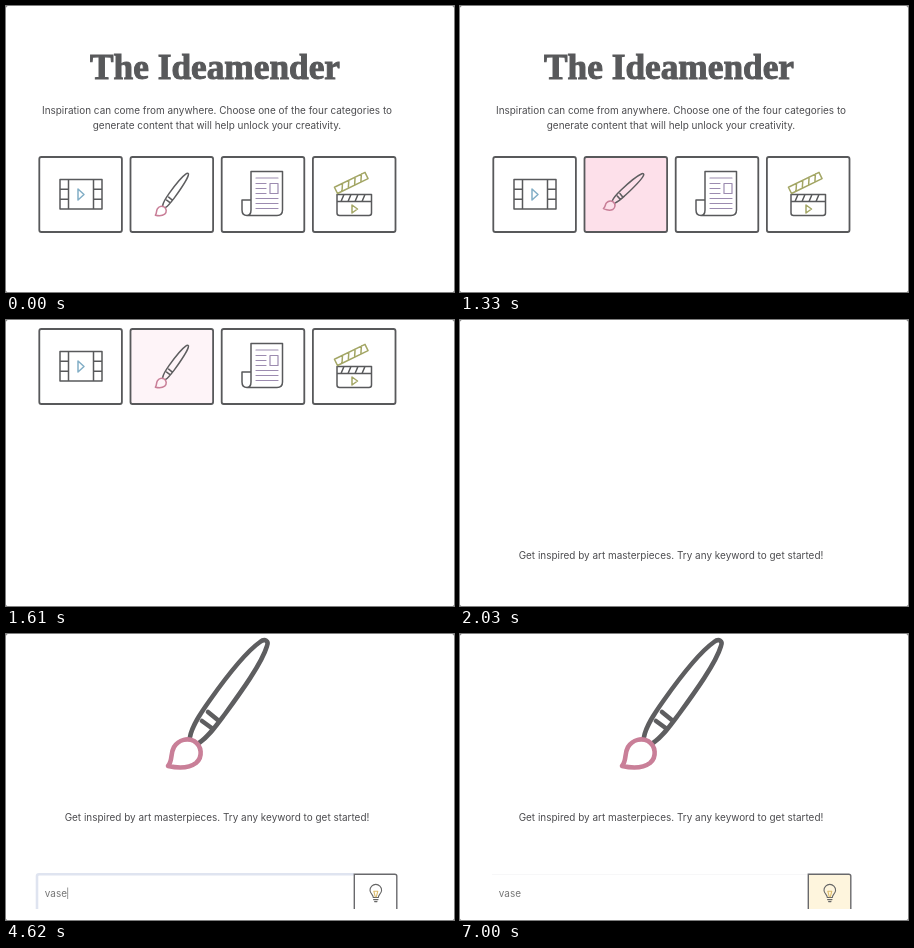
Write an HTML page that moves like this. It is 448 px wide and 286 px high and loops after 8000 ms.

```html
<!DOCTYPE html>
<html lang="en">
<head>
<meta charset="utf-8">
<title>Idea generator</title>
<style>
  html, body { margin: 0; width: 100%; height: 100%; overflow: hidden; background: #555; }
  svg { display: block; width: 100vw; height: 100vh; background: #fff; border-radius: 2px; }
  text { font-family: Inter, Roboto, sans-serif; font-size: 9.95px; fill: #4c4c4f; }
  .mid { text-anchor: middle; }
  .title { font: bold 35.3px "Liberation Serif", "Noto Serif", serif; fill: #58595b; stroke: #58595b; stroke-width: 1; }
  .typed { fill: #757575; }
  .card, .icon { fill: none; stroke: #58595b; stroke-width: 1.5; stroke-linejoin: round; stroke-linecap: round; }
  .card { stroke-width: 1.8; }
  .blue { stroke: #82aec6; }
  .purple { stroke: #9c8bb0; stroke-width: 1.2; }
  .olive { stroke: #a3a665; }
  .brush { fill: none; stroke: #5e5e60; stroke-width: 4.6; stroke-linecap: round; stroke-linejoin: round; }
  .bristle { stroke: #c97f98; }
</style>
</head>
<body>
<svg viewBox="0 0 448 286">
  <defs>
    <g id="brush" class="brush">
      <path d="M184 103C186 92 194 80 204 66C221 42 240 18 254 8C259 4 263 7 261 12C256 29 235 58 219 80C210 92 203 102 193 109M202 78L213 87M196 87L207 95"/>
      <path class="bristle" d="M162 132C167 126 164 120 168 113C173 105 182 104 188 107C196 112 197 123 190 129C182 135 171 134 162 132Z"/>
    </g>
  </defs>

  <g id="home">
    <text class="title mid" x="209" y="73">The Ideamender</text>
    <text class="mid" x="211" y="107.5">Inspiration can come from anywhere. Choose one of the four categories to</text>
    <text class="mid" x="211" y="123">generate content that will help unlock your creativity.</text>
    <rect id="tint" x="125" y="151" width="82" height="75" fill="#fde0ea"/>
    <g id="cards"></g>

    <g class="icon">
      <path d="M54 173.5H96V203H54ZM62.5 173.5V203M87.5 173.5V203M54 183.3h8.5M54 193.2h8.5M87.5 183.3H96M87.5 193.2H96"/>
      <path class="blue" d="M72 183L78 188.5L72 194Z"/>
    </g>
    <use id="smallBrush" href="#brush"/>
    <g class="icon">
      <path d="M245 204V165.5H276.5V204Q276.5 209.5 271 209.5H241Q236 209.5 236 204V194H245V204Q245 209.5 240.5 209.5"/>
      <path class="purple" d="M250 172H272M250 177.5h10M250 182.5h10M250 187.5h10M250 192.5H272M250 197.5H272M250 202.5H272M264 177.5h8v10h-8Z"/>
    </g>
    <g class="icon">
      <path d="M331 188.5H365.5V207Q365.5 209.5 363 209.5H333.5Q331 209.5 331 207ZM331 195.5H365.5M338 188.5l-3 7M345 188.5l-3 7M352 188.5l-3 7M359 188.5l-3 7"/>
      <path class="olive" d="M346 199L351.5 203L346 207Z"/>
      <path class="olive" transform="translate(331.5 187.5) rotate(-26)" d="M0 0V-7H34V0ZM5 0l4 -7M12 0l4 -7M19 0l4 -7M26 0l4 -7"/>
    </g>
  </g>

  <g id="search">
    <use id="bigBrush" href="#brush"/>
    <text class="mid" x="211" y="187">Get inspired by art masterpieces. Try any keyword to get started!</text>
    <path d="M32 240.5H348" stroke="#f7f7f8"/>
    <path id="glow" d="M31 290V242Q31 240.3 33 240.3H348" fill="none" stroke="#dfe4f0" stroke-width="2.6"/>
    <path id="button" d="M348.3 290V240.3H388.8Q390.8 240.3 390.8 242.3V290" fill="#fef5dd" stroke="#69696c" stroke-width="1.4"/>
    <g fill="none" stroke-width="1.1" stroke-linecap="round">
      <path d="M367.3 263.5C367.3 260.5 364 259.7 364 256.2A5.8 5.8 0 0 1 375.6 256.2C375.6 259.7 372.3 260.5 372.3 263.5Z" stroke="#666"/>
      <path d="M367.8 257.2L369.2 262.7M371.8 257.2L370.4 262.7M367.8 257.2h4" stroke="#dcbc6c"/>
      <path d="M367.6 265.6h4.4M368.6 267.6h2.4" stroke="#666"/>
    </g>
    <text id="typed" class="typed" x="38.8" y="263"></text>
    <rect id="caret" y="253.5" width="1" height="11.5" fill="#999"/>
  </g>
  <rect y="275" width="448" height="11" fill="#fff"/>
</svg>
<script>
const LOOP = 8000, STEP = 70;
const el = id => document.getElementById(id);

el("cards").innerHTML = [0, 1, 2, 3].map(i =>
  `<rect class="card" x="${33.3 + i * 91.2}" y="151" width="82.6" height="75" rx="2"/>`).join("");

// Tables of [time, value], read linearly between entries.
const scroll = [[1330, 0], [1400, 12], [1470, 45], [1540, 93], [1610, 142], [1680, 192]];
const tint = [[840, 0], [1190, 1], [1400, 1], [1610, .35], [1680, .1]];
const tilt = [[840, 0], [1190, 11], [1400, 11], [1610, 0]];
const rise = [[1960, 78], [2030, 52], [2100, 26], [2170, 9], [2240, 0]];
const brushFade = [[2030, 0], [2170, 1]];
const hover = [[5670, 0], [5810, 1]];
const glow = [[6300, 1], [7000, 0]];
const keys = [4130, 4270, 4410, 4620];
const blinks = [2450, 3010, 3640, 5180, 5740, 6300];

function read(table, t) {
  const next = table.findIndex(([time]) => time > t);
  if (next === 0) return table[0][1];
  if (next < 0) return table[table.length - 1][1];
  const [t0, a] = table[next - 1], [t1, b] = table[next];
  return a + (b - a) * (t - t0) / (t1 - t0);
}

const passed = (times, t) => times.filter(time => time <= t).length;
const show = (id, on) => el(id).setAttribute("display", on ? "inline" : "none");
const set = (id, name, value) => el(id).setAttribute(name, value);

function render(time) {
  const t = Math.floor(time / STEP) * STEP;
  show("home", t < 1820);
  set("home", "transform", `translate(0 ${-read(scroll, t)})`);
  set("tint", "opacity", read(tint, t));
  set("smallBrush", "transform",
    `rotate(${read(tilt, t)} 180 175) translate(166 188.5) scale(.333) translate(-212 -70)`);

  show("search", t >= 1960);
  set("search", "transform", `translate(0 ${read(rise, t)})`);
  set("bigBrush", "opacity", read(brushFade, t));
  set("button", "fill-opacity", read(hover, t));
  set("glow", "opacity", read(glow, t));

  el("typed").textContent = "vase".slice(0, passed(keys, t));
  show("caret", passed(blinks, t) % 2);
  const width = t < keys[0] ? 0 : el("typed").getComputedTextLength();
  set("caret", "x", 39 + width);
}

const start = performance.now();
function tick() {
  render((performance.now() - start) % LOOP);
  requestAnimationFrame(tick);
}
tick();
</script>
</body>
</html>
```
